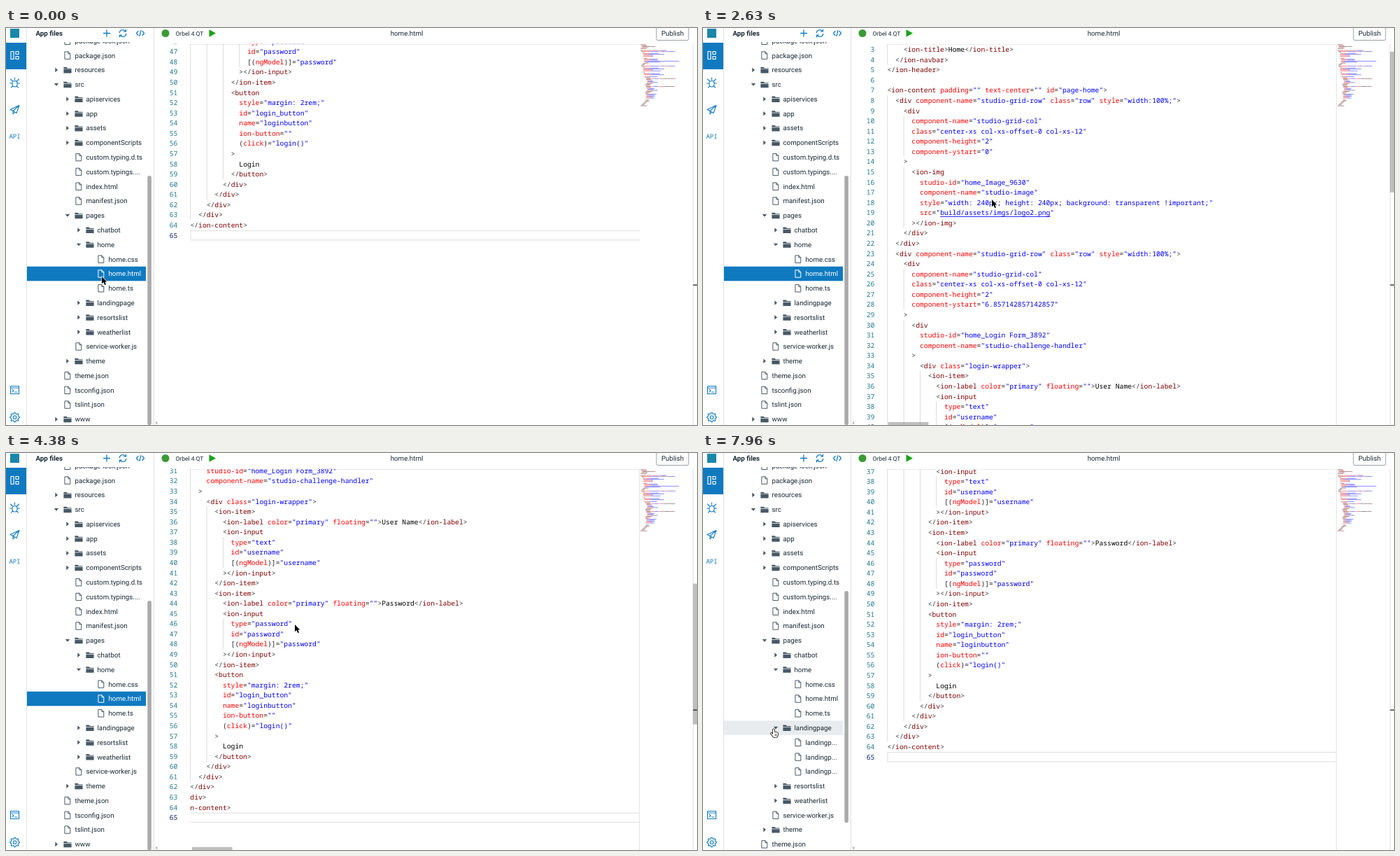
Recreate the animation shown at these times as an HTML page with a canvas. Size 988 px wide and 567 px high, loop 8000 ms.

```html
<!DOCTYPE html>
<html lang="en">
<head>
<meta charset="utf-8">
<title>Code editor</title>
<style>
html, body { margin: 0; width: 100%; height: 100%; overflow: hidden; background: #fff; }
canvas { display: block; }
</style>
</head>
<body>
<canvas id="stage" width="988" height="567"></canvas>
<script>
const ctx = document.getElementById('stage').getContext('2d');
ctx.textRendering = 'geometricPrecision';

const LOOP = 8000;
const UI = '9.75px Roboto, sans-serif';
const MONO = '9.71px "Noto Sans Mono", "Liberation Mono", monospace';
const BLUE = '#0f7ac0', INK = '#1a2a35', SLATE = '#475966';
const ROW = 20.79, LINE = 14.57, CHAR = 5.828, CODE_X = 263.4, TOP = 22.6;

// depth, kind (- file, > closed folder, v open folder, + file in the folder being opened), name
const tree = `1 - package-lock.json
1 - package.json
1 > resources
1 v src
2 > apiservices
2 > app
2 > assets
2 > componentScripts
2 - custom.typing.d.ts
2 - custom.typings....
2 - index.html
2 - manifest.json
2 v pages
3 > chatbot
3 v home
4 - home.css
4 - home.html
4 - home.ts
3 > landingpage
4 + landingp...
4 + landingp...
4 + landingp...
3 > resortslist
3 > weatherlist
2 - service-worker.js
2 > theme
1 - theme.json
1 - tsconfig.json
1 - tslint.json
1 > www`.split('\n').map(row => row.split(' '));

const code = `<ion-header>
  <ion-navbar>
    <ion-title>Home</ion-title>
  </ion-navbar>
</ion-header>

<ion-content padding="" text-center="" id="page-home">
  <div component-name="studio-grid-row" class="row" style="width:100%;">
    <div
      component-name="studio-grid-col"
      class="center-xs col-xs-offset-0 col-xs-12"
      component-height="2"
      component-ystart="0"
    >
      <ion-img
        studio-id="home_Image_9630"
        component-name="studio-image"
        style="width: 240px; height: 240px; background: transparent !important;"
        src="build/assets/imgs/logo2.png"
      ></ion-img>
    </div>
  </div>
  <div component-name="studio-grid-row" class="row" style="width:100%;">
    <div
      component-name="studio-grid-col"
      class="center-xs col-xs-offset-0 col-xs-12"
      component-height="2"
      component-ystart="6.857142857142857"
    >
      <div
        studio-id="home_Login Form_3892"
        component-name="studio-challenge-handler"
      >
        <div class="login-wrapper">
          <ion-item>
            <ion-label color="primary" floating="">User Name</ion-label>
            <ion-input
              type="text"
              id="username"
              [(ngModel)]="username"
            ></ion-input>
          </ion-item>
          <ion-item>
            <ion-label color="primary" floating="">Password</ion-label>
            <ion-input
              type="password"
              id="password"
              [(ngModel)]="password"
            ></ion-input>
          </ion-item>
          <button
            style="margin: 2rem;"
            id="login_button"
            name="loginbutton"
            ion-button=""
            (click)="login()"
          >
            Login
          </button>
        </div>
      </div>
    </div>
  </div>
</ion-content>
`;

// groups: bracket, equals, string, tag, attribute, binding mark, plain text
const TOKEN = /(<\/?|>)|(=)|("[^"]*")|((?<=<\/?)[\w-]+)|([\w-]+(?=\)?\]?=))|([()[\]]+)|([^\s<>="()[\]]+)/g;
const TOKEN_COLORS = ['#383838', '#222', '#00f', '#800000', '#f00', '#222', '#000'];
const lines = code.split('\n').map(text => ({
  indent: text.search(/\S|$/),
  tokens: [...text.matchAll(TOKEN)].map(m => ({
    text: m[0], col: m.index, color: TOKEN_COLORS[m.slice(1).findIndex(g => g !== undefined)]
  }))
}));

// held keys: time, then values
const scrollKeys = [
  [0, 667, 0], [1950, 600, 0], [2170, 390, 0], [2400, 150, 0], [2630, 29.1, 0], [2880, 0, 0],
  [3430, 50, 0], [3640, 160.7, 0], [3830, 262, 0], [4010, 345, 8], [4200, 405, 16],
  [4380, 442.4, 23.4], [4550, 485, 12], [4690, 515, 4], [4830, 529, 0]
];
const pointerKeys = [
  [0, 137, 355], [720, 118, 350], [860, 160, 335], [1000, 235, 302], [1140, 315, 272],
  [1280, 375, 254], [1420, 405, 247], [1560, 413, 245],
  [4970, 395, 262], [5110, 325, 300], [5250, 240, 345], [5390, 165, 380], [5530, 136.5, 387],
  [6350, 130, 389], [6520, 121, 391], [6680, 112, 393], [6850, 105, 394], [7010, 101, 394.5]
];
const barKeys = [[0, 0], [1950, 1], [5820, 0.5], [5980, 0]];
const expandKeys = [[0, 0], [7610, 0.3], [7730, 0.6], [7840, 0.85], [7960, 1]];
const HAND_FROM = 6680, PICK_AT = 7180;

const held = (keys, t) => keys.findLast(key => key[0] <= t).slice(1);
const mix = (a, b, k) => a + (b - a) * k;

function rect(x, y, w, h, color) {
  ctx.fillStyle = color;
  ctx.fillRect(x, y, w, h);
}

function label(text, x, y, color = INK, font = UI, align = 'left') {
  ctx.font = font;
  ctx.textAlign = align;
  ctx.fillStyle = color;
  ctx.fillText(text, x, y + 3.4);
}

function shape(d, x, y, fill, stroke, width = 1.1) {
  const path = new Path2D(d);
  ctx.save();
  ctx.translate(x, y);
  ctx.lineJoin = ctx.lineCap = 'round';
  if (stroke) {
    ctx.strokeStyle = stroke;
    ctx.lineWidth = width;
    ctx.stroke(path);
  }
  if (fill) {
    ctx.fillStyle = fill;
    ctx.fill(path);
  }
  ctx.restore();
}

function clipped(x, y, w, h, draw) {
  ctx.save();
  ctx.beginPath();
  ctx.rect(x, y, w, h);
  ctx.clip();
  draw();
  ctx.restore();
}

function drawRail() {
  rect(6, 1, 13, 13, '#1b87ab');
  rect(0, 21, 29, 38, BLUE);
  shape('M-5.5-5.5h4v11h-4zM1.5-5.5h4v4h-4zM1.5 1.5h4v4h-4z', 12.5, 39, null, '#fff', 1.2);
  shape('M-3.5 1a3.5 3.5 0 1 1 7 0v1.5a3.5 3.5 0 0 1-7 0zM-7 1h3M4 1h3M-6-5l3 3M6-5l-3 3M-5 7l2-2M5 7l-2-2M0-7v3',
    12.5, 78, null, BLUE);
  shape('M6.5-6L-6.5 0-2.5 2 6.5-6 2.5 5-2.5 2V6.5L0 3.5', 12.5, 116.5, null, BLUE);
  label('API', 12.5, 155, BLUE, '500 9px "Noto Sans Mono", monospace', 'center');
  shape('M-6-5.5H6V5.5H-6zM-6-3H6M-3.5-.8L-1.5 1-3.5 2.8M0 3h3', 12.5, 517, null, BLUE);
  let gear = 'M2.3 0a2.3 2.3 0 1 1-4.6 0a2.3 2.3 0 1 1 4.6 0';
  for (let i = 0; i < 32; i++) {
    const a = (i - 0.5) * Math.PI / 16, r = i % 4 < 2 ? 6.8 : 5.2;
    gear += (i ? 'L' : 'M') + (r * Math.cos(a)).toFixed(2) + ' ' + (r * Math.sin(a)).toFixed(2);
  }
  shape(gear + 'z', 12.5, 556, null, BLUE);
  rect(29, 0, 1, 567, '#dfe3e6');
}

function drawHeader() {
  label('App files', 42.5, 7.5, INK, 'bold 9.75px Roboto, sans-serif');
  shape('M-4.5 0h9M0-4.5v9', 144, 7.5, null, BLUE, 1.3);
  shape('M-4.8-.8A4.8 4.8 0 0 1 4-2.6M4.5-5.5v3h-3M4.8.8A4.8 4.8 0 0 1-4 2.6M-4.5 5.5v-3h3', 167, 7.5, null, BLUE, 1.2);
  shape('M-3-3L-5.5 0-3 3M3-3L5.5 0 3 3M1-4L-1 4', 192, 7.5, null, BLUE, 1.2);
  shape('M5.5 0a5.5 5.5 0 1 1-11 0a5.5 5.5 0 1 1 11 0', 228, 7.5, '#3a9b35');
  label('Orbel 4 QT', 242.5, 7.3, INK, '8.5px Roboto, sans-serif');
  shape('M-4.5-5.3L5 0-4.5 5.3z', 295, 7.5, '#19a319');
  label('home.html', 573, 7.5, INK, UI, 'center');
  shape('M2-6H44q2 0 2 2V15.5q0 2-2 2H2q-2 0-2-2V-4q0-2 2-2z', 930, 0, null, '#8c969c', 0.9);
  label('Publish', 953, 7.5, INK, UI, 'center');
}

function drawTree(t) {
  const [open] = held(expandKeys, t);
  const picked = t >= PICK_AT;
  let y = 39.1 - 2 * ROW;
  for (const [depthText, kind, name] of tree) {
    const child = kind === '+';
    y += ROW * (child ? open : 1);
    const icon = 72 + 16 * depthText;
    const selected = name === 'home.html' && !picked;
    const landing = name === 'landingpage';
    if (selected) rect(30, y - 10.3, 170, 20.6, BLUE);
    if (landing && picked) rect(30, y - 10.3, 170, 20.6, '#e9ecee');
    ctx.globalAlpha = child ? open : 1;
    if (kind === '-' || child) {
      shape('M-3.7-5.2h4.6l2.9 2.9v7.5h-7.5zM.9-5.2v2.9h2.9', icon, y, null, selected ? '#fff' : SLATE, 1);
    } else {
      shape('M-5.6-4.2h4.3l1.3 1.5h5.6v1h-11.2zM-5.6-1h11.2v5.3h-11.2z', icon, y + 0.2, SLATE);
      const down = kind === 'v' || landing && open > 0;
      shape(down ? 'M-3.2-1.7h6.4L0 2z' : 'M-1.7-3.3L2 0-1.7 3.3z', icon - 16, y, SLATE);
    }
    label(name, icon + 10.5, y, selected ? '#fff' : INK);
    ctx.globalAlpha = 1;
  }
  const top = mix(211, 197, open), bottom = mix(567, 528, open);
  ctx.beginPath();
  ctx.roundRect(202.3, top, 5.6, bottom - top, 2.8);
  ctx.fillStyle = '#aaa';
  ctx.fill();
}

function drawCode(scrollY, scrollX) {
  const left = CODE_X - scrollX;
  lines.forEach(({ indent, tokens }, i) => {
    const y = 30.7 + i * LINE - scrollY;
    if (y < 8 || y > 582) return;
    const last = i === lines.length - 1;
    label(i + 1, 245.4, y, last ? '#0b216f' : '#237893', MONO, 'right');
    clipped(263, TOP, 643.5, 545, () => {
      if (last) {
        ctx.strokeStyle = '#e6e6e6';
        ctx.lineWidth = 1.4;
        ctx.strokeRect(left + 0.6, y - 6.6, 680, 13.2);
      }
      for (let col = 0; col < indent; col += 4) rect(left + col * CHAR, y - LINE / 2, 0.8, LINE, '#d3d3d3');
      for (const { text, col, color } of tokens) {
        label(text, left + col * CHAR, y, color, MONO);
        if (text.startsWith('"build/')) rect(left + (col + 1) * CHAR, y + 5, (text.length - 2) * CHAR, 0.9, color);
      }
    });
  });
}

function drawMinimap() {
  ctx.globalAlpha = 0.5;
  lines.forEach(({ tokens }, i) => {
    for (const { text, col, color } of tokens) {
      rect(907 + col * 0.694, 23.3 + i * 1.388, text.length * 0.694, 0.9, color);
    }
  });
  ctx.globalAlpha = 1;
}

function drawEditor(t) {
  const [scrollY, scrollX] = held(scrollKeys, t);
  const [bars] = held(barKeys, t);
  rect(211, 0, 1, 567, '#dcdfe1');
  clipped(212, TOP, 776, 545, () => {
    drawCode(scrollY, scrollX);
    if (scrollY) rect(263, 23, 643, 1, 'rgba(0,0,0,.07)');
    if (t >= 1950) rect(905, 23, 1, 544, '#e4e4e4');
    drawMinimap();
    rect(982, 23, 1, 544, '#e2e2e2');
    const thumb = `rgba(100,100,100,${0.42 * bars})`;
    rect(982.3, 23 + scrollY * 0.37, 5.7, 201, thumb);
    rect(264.8 + scrollX * 0.05, 562.8, 57.5, 4.2, thumb);
    rect(982.5, 366.4, 5.5, 1.4, '#2b2b2b');
    shape('M1.5-2.6v5.2L-1.5 0z', 214.8, 564, '#b5b5b5');
  });
}

function drawPointer(t) {
  const [x, y] = held(pointerKeys, t);
  if (t >= HAND_FROM && t < LOOP) {
    shape('M-1 1q0-1.2 1-1.2t1 1.2v3l4 .8q1.5.4 1.3 2l-.7 3q-.3 1.6-1.6 1.7H.5Q-.8 11-1.6 9.5L-3.8 6.5q-.5-1.2.6-1.3L-1 7z',
      x, y, '#fff', '#111', 1.6);
    shape('M2.2 7v2.5M4 7v2.5', x, y, null, '#111', 0.7);
  } else {
    shape('M0 0V10.2L2.4 8 4.2 12 6 11.2 4.3 7.4H7.3z', x, y, '#000', '#fff', 1.3);
  }
}

function frame(now) {
  const t = now % LOOP;
  rect(0, 0, 988, 567, '#fff');
  clipped(30, 20, 181, 547, () => drawTree(t));
  drawEditor(t);
  drawHeader();
  drawRail();
  drawPointer(t);
  requestAnimationFrame(frame);
}
requestAnimationFrame(frame);
</script>
</body>
</html>
```
